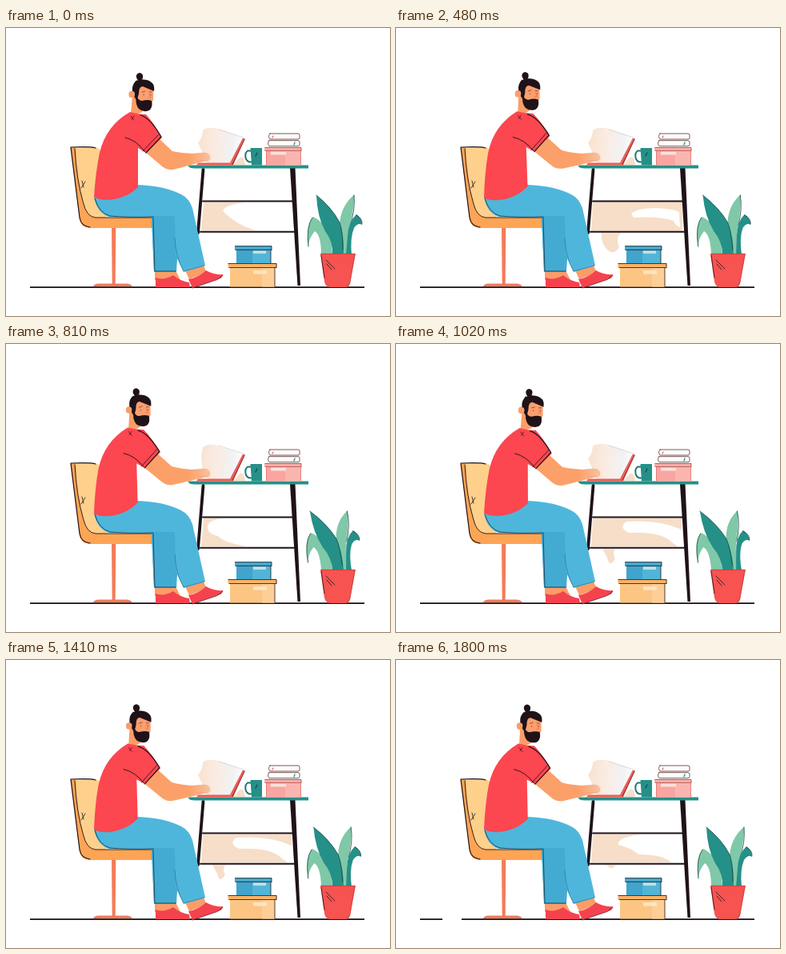
Write an HTML page with a canvas that moves like this. It is 480 by 360 pixels and loops after 1830 ms.

```html
<!DOCTYPE html>
<html lang="en">
<head>
<meta charset="utf-8">
<title>Man working at a desk</title>
<style>
html, body { margin: 0; width: 100%; height: 100%; overflow: hidden; background: #fff; }
canvas { display: block; }
</style>
</head>
<body>
<canvas id="stage" width="480" height="360"></canvas>
<script>
const ctx = document.getElementById('stage').getContext('2d');
const LOOP = 1830, STEP = 30;
const INK = '#1f1218', RED = '#fc4650', SKIN = '#fb9d67', BLUE = '#4fb6db',
      TEAL = '#259088', MINT = '#7fc8a8', SAND = '#f7dec8', ORANGE = '#fda455';
const HIP = [135, 212];
ctx.lineCap = ctx.lineJoin = 'round';

function fill(d, color) {
  ctx.fillStyle = color;
  ctx.fill(new Path2D(d), 'evenodd');
}
function line(d, width = 1, color = INK) {
  ctx.strokeStyle = color;
  ctx.lineWidth = width;
  ctx.stroke(new Path2D(d));
}
function rect(x, y, w, h, color) {
  ctx.fillStyle = color;
  ctx.fillRect(x, y, w, h);
}
// Horizontal shear: zero at baseY, dx at topY
function shear(dx, baseY, topY, draw) {
  const k = dx / (topY - baseY);
  ctx.save();
  ctx.transform(1, 0, k, 1, -k * baseY, 0);
  draw();
  ctx.restore();
}
// The upper body turns about the hip
function turned(angle, draw) {
  ctx.save();
  ctx.translate(...HIP);
  ctx.rotate(angle);
  ctx.translate(-HIP[0], -HIP[1]);
  draw();
  ctx.restore();
}
function turnPoint(x, y, angle) {
  const dx = x - HIP[0], dy = y - HIP[1], c = Math.cos(angle), s = Math.sin(angle);
  return [HIP[0] + dx * c - dy * s, HIP[1] + dx * s + dy * c].join(' ');
}

const LEAN = [[0, 0], [620, -4.7], [1120, 0], [1600, -4.6], [2000, 0]];
function lean(t) {
  const i = LEAN.findIndex(k => k[0] > t);
  const [t0, a] = LEAN[i - 1], [t1, b] = LEAN[i];
  return (a + (b - a) * (1 - Math.cos(Math.PI * (t - t0) / (t1 - t0))) / 2) / 115;
}

// Shapes of the soft shade below the desk, each shown from its start time
const DRIP = 'M257 256H281Q274 263 279 274Q272 285 264 277Q256 270 257 256Z';
const THIN = 'M258 256H274Q270 262 274 268Q267 281 264 267Z';
const SHADES = [
  [0, 'M247 218H300Q268 222 272 230Q288 246 312 253H244Z'],
  [120, ''],
  [330, 'M246 217H358V254H244ZM294 232Q302 225 325 225Q346 226 354 230L355 249Q349 247 347 241Q330 235 297 237Z' + DRIP],
  [660, 'M247 218H271Q250 220 252 231Q254 238 265 240Q273 249 303 253H244Z'],
  [1020, 'M246 218H357V232Q330 219 288 222Q277 230 292 236Q331 234 345 248L352 253H244Z' + THIN],
  [1440, 'M246 218H326Q287 220 284 229Q296 236 323 236Q345 240 352 253H244Z' + THIN],
  [1710, 'M246 218H307Q275 222 278 231Q296 236 303 243Q334 243 344 253H244ZM257 256H275Q269 264 264 257Z']
];
function shade(t) {
  fill(SHADES.filter(s => s[0] <= t).pop()[1], SAND);
}

function ground(t) {
  rect(30, 323.2, 418, 1.8, INK);
  if (t > 1500 && t < 1700) { rect(46, 322, 11, 4, '#fff'); rect(61, 322, 11, 4, '#fff'); }
  else if (t >= 1700) rect(58, 322, 24, 4, '#fff');
}

function chair() {
  fill('M132 249H137.3L136.7 320H132.7Z', '#f47b58');
  fill('M109 323Q110 319.5 116 319.5H151Q157 320 157.5 323Z', '#f47b58');
  fill('M82 149H109Q117 149 119 155L126 240H100Z', '#fed08c');
  fill('M80.5 149H87Q89 190 97 220Q101 236 112 237H184V250H104Q94 249 92 240Z', ORANGE);
  line('M86 151Q88 190 97 220Q101 236 112 237H183', .9);
  line('M112 150Q107 148 81 149L92 237Q94 248 105 249', 1.2);
  line('M94 200L99 192M95 191L97 199', .8);
}

function desk() {
  line('M246.5 177L240 256', 3.8);
  fill('M355 175H361.5L368 322H364.5Z', INK);
  line('M246 216.5H358M243 254.8H362', 2);
  fill('M228 171.5H378V175.5H236Q230 175.5 228 173Z', TEAL);
}

function boxes() {
  rect(280, 299, 56, 24.5, '#fdc583');
  rect(320, 299, 16, 24.5, '#fdcf97');
  rect(277.5, 294, 61, 5.5, '#fbb267');
  rect(309, 303, 17, 4.5, '#ffe4bf');
  line('M278 294.5H338V299M279 299.5H338M336 300V323', .8);
  rect(288, 277, 43, 17, '#52b5d8');
  rect(288, 277, 20, 17, '#41a4cd');
  rect(286, 272.5, 46, 5, '#45add1');
  rect(309, 278.5, 16, 3.5, '#bfe2e4');
  line('M286.5 272.7H332V277M287 277.3H332M331 278V294', .8);
}

function book(x, y) {
  const d = `M${x + 2} ${y}H365Q367 ${y} 367 ${y + 2}V${y + 5}Q367 ${y + 7} 365 ${y + 7}H${x + 2}Q${x - 1} ${y + 3.5} ${x + 2} ${y}Z`;
  fill(d, '#fff');
  line(d, .9, '#6d4440');
}

function deskItems(t) {
  rect(325, 153, 43.5, 18.5, '#f9a5a2');
  rect(349, 153, 19.5, 18.5, '#f9b6b0');
  rect(323, 149, 46, 4.5, '#f9b3ac');
  rect(331, 154.5, 19, 4, '#fde0da');
  line('M324 149.5H369V153M324 153.3H369', .8, '#a84549');
  line('M325.5 154V171M368.5 154V171', .8, '#e2716f');
  book(328, 132);
  book(327, 140.7);
  line('M334 135L333 137', 1.3, '#f2655f');
  line('M361 143L360 146', 1.3, TEAL);

  fill('M285 171L291 163Q297 158 299 171Z', SAND);
  line('M306 153.5H302Q298.5 156 299.5 162Q301 168 306.5 167.5', 2, '#1c7873');
  fill('M305.5 150H320V171.5H307Z', TEAL);
  line('M312 160L314 156', .8);

  const g = ctx.createLinearGradient(240, 145, 298, 150);
  g.addColorStop(0, '#f8e2d0');
  g.addColorStop(.4, '#faece3');
  g.addColorStop(.75, '#f1f2f4');
  g.addColorStop(1, '#fff');
  const low = t > 660 && t < 1020;
  fill(low
    ? 'M246 156Q242 136 247 128Q256 123 270 129L298 137L282 169H252Z'
    : 'M240 143Q245 139 246 128Q252 122 270 127L298 137L282 169H250Q252 156 246 157Z', g);
  line('M266 127L297 137', .6, '#cfc8c8');
  fill('M296 137.5L298.5 138.5L284 171.5H238L240 168.5H280Z', '#ec5e57');
  line('M298.3 139L283 170.5', .9, '#70272e');
}

function leaf(dx, topY, d, color, vein) {
  shear(dx, 282, topY, () => {
    fill(d, color);
    line(vein, .8, '#204744');
  });
}

function plant(t) {
  const s = 4.4 * (Math.cos(2 * Math.PI * t / LOOP) - 1);
  leaf(s, 209, 'M435.5 208Q417 224 417 248L421 284H429Q425 262 430 245Q435 226 435.5 208Z',
    MINT, 'M435 209Q437 226 430 247');
  leaf(s * .45, 237, 'M445 246Q445 237 438 233Q428 242 427 260L425 284H432Q430 262 435 250Q440 243 445 246Z',
    TEAL, 'M438 234Q446 238 445 245');
  leaf(s * .3, 237, 'M378 275Q374 247 384 236Q399 243 406 263L408 284H394Q394 259 386 254Q378 263 378 275Z',
    MINT, 'M378 273Q375 248 383 237');
  leaf(s * .95, 209, 'M388 209Q407 224 417 243Q423 260 422 284H408Q409 267 399 254Q389 236 388 209Z',
    TEAL, 'M388 209Q407 224 417 243Q421 254 421 277');
  if (t > 150 && t < 270) fill('M435 199Q439 191 446 191Q443 196 435 199Z', '#fbe0c9');

  fill('M393 282H437L430 319Q429 324 424 324H405Q399 323 398 317Z', '#f75350');
  line('M394 282.3H436L430 318Q429 322 426 323.5', .7, '#b53a3b');
  line('M400 290L411 301M401 295L407 302M394 284L398 312', .8);
}

function legs() {
  fill('M186 305H213L218 315H186Z', SKIN);
  fill('M187 312Q197 316 209 309Q219 317 229 318L230 324H187Z', '#f4434e');
  fill('M224 303L247 297L251 306L229 314Z', SKIN);
  fill('M228 314Q241 312 250 303Q260 309 271 308Q271 313 265 314L233 325Z', '#f4434e');
  line('M233 325L264 314.5L271 309', .8, '#64212a');

  fill('M181 218H212L215 270L213 305H185Z', '#41a8d0');
  fill('M110 211Q135 214 164 196Q198 197 219 208Q229 213 233 225L249 297L222 305L212 284Q207 266 208 236L128 236Q113 230 110 211Z', BLUE);
  fill('M182 235H211L213 304H185Z', '#43abd2');
  line('M111 213Q116 231 130 235Q151 237 184 236L186 304H212', .9, '#1c4054');
  line('M211 263Q212 286 222 304L248 297', .7, '#2c7899');
}

function head(t) {
  fill('M158 84L166 86L172 103Q167 109 156 107Z', SKIN);
  fill('M163 69H182Q185 76 184 90L180 98H166Q160 88 163 69Z', '#fb9f6f');
  ctx.beginPath();
  ctx.ellipse(157, 83, 3.6, 4.3, 0, 0, 7);
  ctx.fillStyle = SKIN;
  ctx.fill();
  fill('M158 79Q157 70 163 66Q176 62 183 69Q186 72 185 79L171 73Q166 73 166 82L163.5 91L160.5 86Q162 79 158 79Z', INK);
  fill('M163 84Q165 91 170 91Q177 89 182 91Q184 99 179 103Q172 106 166 101Q161 95 163 84Z', INK);
  fill('M163 62Q162 57 167 56Q172 57 171 62Q170 67 165 66Z', INK);
  line('M170 65L174 66M163 66L161 69', 1.2);
  line('M179 82L181 87L178 87', .7, '#dd6c50');
  if (t > 1200 && t < 1330) line('M170 82H174M180 82H183', .8, '#873e35');
  else line('M172 83V84M181 83V84M170 80L174 79M179 80H182', .8, '#873e35');
}

function arm(a) {
  const g = ctx.createLinearGradient(228, 0, 257, 0);
  g.addColorStop(0, '#fca069');
  g.addColorStop(1, '#f8c4a2');
  fill(`M${turnPoint(192, 139, a)}L${turnPoint(208, 154, a / 2)}Q222 157 238 157L251 156Q257 159 255 165L241 168.5L${turnPoint(209, 177, a / 2)}Q${turnPoint(200, 178, a / 2)} ${turnPoint(194, 172, a / 2)}L${turnPoint(175, 156, a)}Z`, g);
  line('M236 157L248 156M239 166L253 166', .6, '#e89a74');
}

function shirt() {
  fill('M155 105Q166 108 175 108Q185 119 195 137L175 156L165 150L165 199Q151 213 128 215Q115 215 110 211Q112 180 117 156Q125 122 155 105Z', RED);
  line('M168 109Q180 112 194 136L175 156', 1.2);
  line('M191 133L171 154', .8);
  line('M149 137Q163 140 174 155', .9);
  line('M156 110L160 115M160 110L157 114', .7);
}

function render(t) {
  const a = lean(t);
  rect(0, 0, 480, 360, '#fff');
  shade(t);
  ground(t);
  desk();
  boxes();
  deskItems(t);
  plant(t);
  chair();
  legs();
  turned(a, () => head(t));
  arm(a);
  turned(a, shirt);
}

const start = performance.now();
function tick() {
  const t = (performance.now() - start) % LOOP;
  render(Math.floor(t / STEP) * STEP);
  requestAnimationFrame(tick);
}
tick();
</script>
</body>
</html>
```
